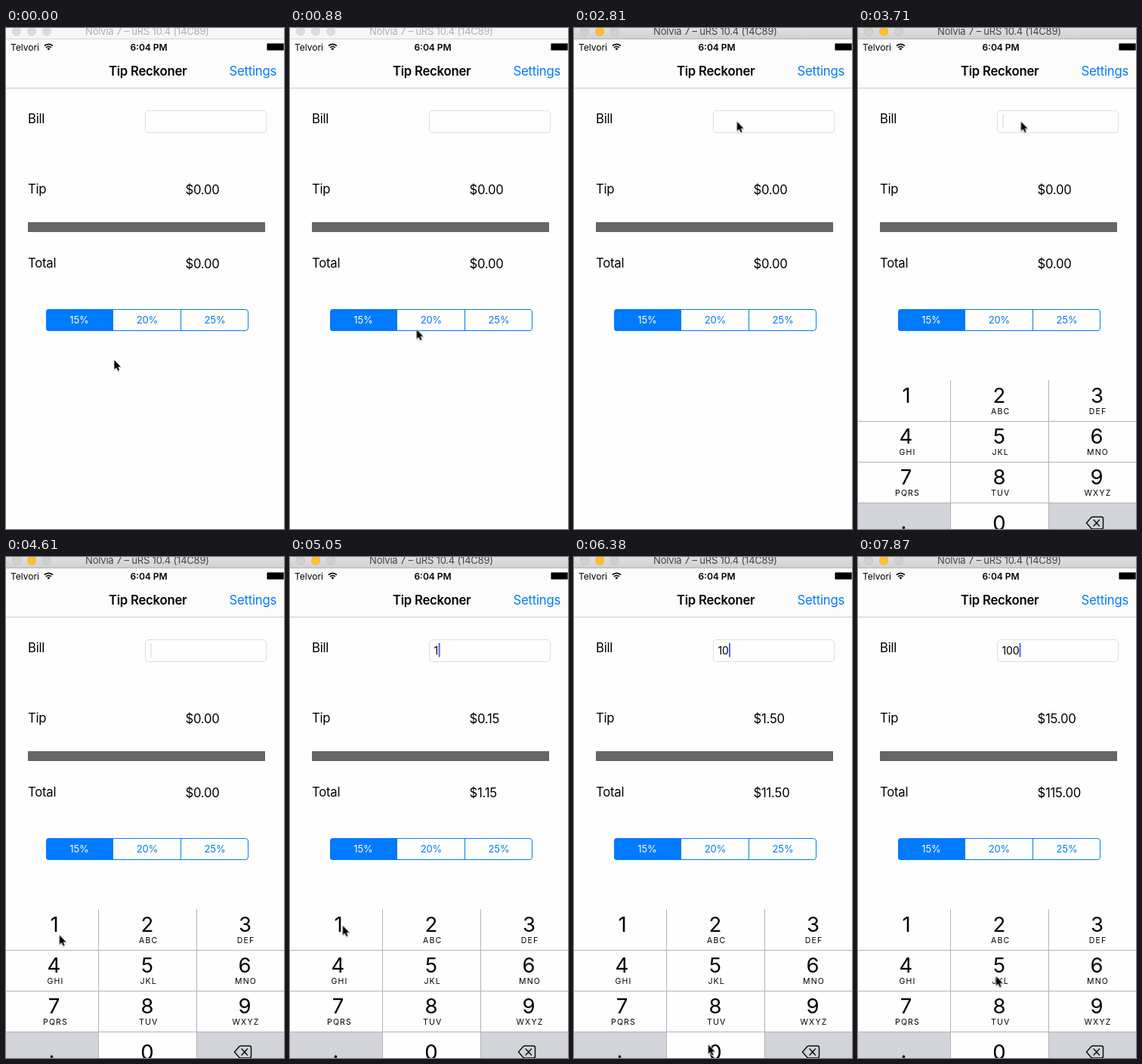
An HTML page for the animation above (8 s loop, 368x663 px).

```html
<!DOCTYPE html>
<html lang="en">
<head>
<meta charset="utf-8">
<title>Tip Reckoner</title>
<style>
html, body { margin: 0; width: 100%; height: 100%; overflow: hidden; background: #fefefe; }
svg { display: block; width: 368px; height: 663px; font: 16.7px Inter, Roboto, sans-serif; letter-spacing: -.22px; }
.mid { text-anchor: middle; }
.bar { font-size: 13px; letter-spacing: -.2px; }
.status { font-size: 12px; letter-spacing: 0; }
.bold { font-weight: 600; }
.bill { font-size: 14px; letter-spacing: -.2px; }
.seg { font-size: 13px; letter-spacing: -.1px; fill: #007aff; }
.digit { font-size: 27.5px; letter-spacing: 0; }
.abc { font-size: 10.5px; letter-spacing: 1.2px; }

.active, .s0, .s1, .s2, .s3, .press1, .press0, #caret, #caretX, #pad, #cursor {
  animation: 8s step-end infinite;
}
.active { animation-name: active; }
.s0 { animation-name: s0; }
.s1 { animation-name: s1; }
.s2 { animation-name: s2; }
.s3 { animation-name: s3; }
.press1 { animation-name: press1; }
.press0 { animation-name: press0; }
#caret { animation-name: blink; }
#caretX { animation-name: caretX; }
#pad { animation-name: pad; }
#cursor { animation-name: cursor; }

@keyframes active { 0% { opacity: 0 } 33.375%, 100% { opacity: 1 } }

/* amounts change when a key is let go */
@keyframes s0 { 0% { opacity: 1 } 63.125%, 100% { opacity: 0 } }
@keyframes s1 { 0%, 79.75%, 100% { opacity: 0 } 63.125% { opacity: 1 } }
@keyframes s2 { 0%, 85.375%, 100% { opacity: 0 } 79.75% { opacity: 1 } }
@keyframes s3 { 0% { opacity: 0 } 85.375%, 100% { opacity: 1 } }
@keyframes press1 { 0%, 63.125%, 100% { opacity: 0 } 61.25% { opacity: 1 } }
@keyframes press0 { 0%, 79.75%, 85.375%, 100% { opacity: 0 } 77.875%, 83.5% { opacity: 1 } }

@keyframes blink {
  0%, 48.25%, 59.375%, 70.5%, 92.75% { opacity: 0 }
  40.75%, 53.875%, 63.125%, 76%, 98.375%, 100% { opacity: 1 }
  46.375%, 52%, 57.5%, 68.625%, 74.125%, 90.875%, 96.5% { opacity: .15 }
}
@keyframes caretX {
  0% { transform: translateX(191px) }
  63.125% { transform: translateX(196.6px) }
  79.75% { transform: translateX(205px) }
  85.375%, 100% { transform: translateX(213.5px) }
}
@keyframes pad {
  0% { transform: translateY(200px) }
  37% { transform: translateY(150px) }
  38.875% { transform: translateY(55px) }
  40.75% { transform: translateY(10px) }
  42.625%, 100% { transform: none }
}
@keyframes cursor {
  0% { transform: translate(142.5px, 438px) }
  1.75% { transform: translate(142.5px, 438px); animation-timing-function: steps(7, start) }
  14.625% { transform: translate(171px, 391px) }
  16.625% { transform: translate(171px, 391px); animation-timing-function: steps(4, start) }
  23.875% { transform: translate(245.5px, 198.5px) }
  25.875% { transform: translate(245.5px, 198.5px); animation-timing-function: steps(4, start) }
  33.25% { transform: translate(215px, 122.5px) }
  48.25% { transform: translate(215px, 122.5px); animation-timing-function: steps(4, start) }
  55.69% { transform: translate(72px, 524px); animation-timing-function: steps(3, start) }
  61.2% { transform: translate(69px, 486.5px) }
  65% { transform: translate(69px, 486.5px); animation-timing-function: steps(4, start) }
  72.25% { transform: translate(160px, 636px) }
  74.125% { transform: translate(160px, 636px); animation-timing-function: steps(2, start) }
  77.75% { transform: translate(177px, 644px) }
  96.5% { transform: translate(177px, 644px); animation-timing-function: steps(2, start) }
  100% { transform: translate(182px, 553.5px) }
}
</style>
</head>
<body>
<svg viewBox="0 0 368 663">
  <defs>
    <linearGradient id="chrome" x1="0" y1="0" x2="0" y2="1">
      <stop offset="0" stop-color="#e0e0e0"/><stop offset="1" stop-color="#d0d0d0"/>
    </linearGradient>
    <filter id="soft" x="-50%" y="-50%" width="200%" height="200%">
      <feDropShadow dx="0" dy="1" stdDeviation=".8" flood-opacity=".4"/>
    </filter>
  </defs>
  <rect width="368" height="663" fill="#fefefe"/>

  <!-- window bar -->
  <g class="bar mid">
    <rect width="368" height="14" fill="#f6f6f6"/>
    <rect y="14" width="368" height="1" fill="#d4d4d4"/>
    <g fill="#dcdcdc" stroke="#d5d5d5">
      <circle cx="14" cy="4.5" r="5.5"/><circle cx="34" cy="4.5" r="5.5"/><circle cx="54" cy="4.5" r="5.5"/>
    </g>
    <text x="187" y="9" fill="#b0b0b0">Nolvia 7 – uRS 10.4 (14C89)</text>
    <g class="active">
      <rect width="368" height="14" fill="url(#chrome)"/>
      <rect y="14" width="368" height="1" fill="#b4b4b4"/>
      <g fill="#d0d0d0" stroke="#c2c2c2">
        <circle cx="14" cy="4.5" r="5.5"/><circle cx="54" cy="4.5" r="5.5"/>
        <circle cx="34" cy="4.5" r="5.5" fill="#ffbf2f" stroke="#f3b32c"/>
      </g>
      <text x="187" y="9" fill="#444">Nolvia 7 – uRS 10.4 (14C89)</text>
    </g>
  </g>

  <!-- status and navigation -->
  <rect y="15" width="368" height="64" fill="#fcfcfc"/>
  <rect y="79" width="368" height="1" fill="#cacaca"/>
  <text class="status" x="6" y="29.5">Telvori</text>
  <g fill="none" stroke="#000" stroke-width="1.7">
    <path d="M50.9 23.6A7.8 7.8 0 0 1 61.9 23.6M53 25.9A4.8 4.8 0 0 1 59.8 25.9"/>
    <path d="M56.4 29.6L54.4 27.4A2.9 2.9 0 0 1 58.4 27.4Z" fill="#000" stroke="none"/>
  </g>
  <text class="status bold mid" x="189" y="29.5">6:04 PM</text>
  <rect x="345" y="20" width="24" height="10" rx="1.5" fill="#888"/>
  <rect x="345.8" y="20.800" width="21.500" height="8.4" rx=".8"/>
  <text class="bold mid" x="187.7" y="63">Tip Reckoner</text>
  <text x="295.5" y="63" fill="#007aff">Settings</text>

  <!-- form -->
  <text x="29" y="126">Bill</text>
  <text x="29" y="219">Tip</text>
  <text x="29" y="317">Total</text>
  <rect x="184.5" y="109.5" width="160" height="29" rx="4.5" fill="#fefefe" stroke="#dedede"/>
  <rect x="29" y="257" width="314" height="13" fill="#666"/>
  <g class="s0"><text x="237.5" y="220">$0.00</text><text x="237.5" y="318">$0.00</text></g>
  <g class="s1">
    <text class="bill" x="190.5" y="129">1</text>
    <text x="237.5" y="220">$0.15</text><text x="237.5" y="318">$1.15</text>
  </g>
  <g class="s2">
    <text class="bill" x="190.5" y="129">10</text>
    <text x="237.5" y="220">$1.50</text><text x="237.5" y="318">$11.50</text>
  </g>
  <g class="s3">
    <text class="bill" x="190.5" y="129">100</text>
    <text x="237.5" y="220">$15.00</text><text x="237.5" y="318">$115.00</text>
  </g>
  <g id="caretX"><rect id="caret" y="114" width="2" height="18.5" fill="#426bf2"/></g>

  <!-- rate picker -->
  <rect x="53.5" y="372.5" width="267" height="28" rx="3.5" fill="#fefefe" stroke="#007aff"/>
  <path d="M142 372H57A4 4 0 0 0 53 376V397A4 4 0 0 0 57 401H142Z" fill="#007aff"/>
  <path d="M231.5 372.5V400.5" stroke="#007aff"/>
  <g class="seg mid">
    <text x="97" y="391" style="fill:#fff">15%</text>
    <text x="187" y="391">20%</text>
    <text x="276.5" y="391">25%</text>
  </g>

  <!-- keypad -->
  <g id="pad">
    <rect y="466" width="368" height="200" fill="#fefefe"/>
    <g fill="#d2d4da">
      <rect y="628" width="122.5" height="40"/><rect x="252.5" y="628" width="116" height="40"/>
      <rect class="press1" y="466" width="122.5" height="54"/>
      <rect class="press0" x="122.5" y="628" width="130" height="40"/>
    </g>
    <path d="M0 520.5H368M0 574.5H368M0 628.5H368M122.5 466V668M252.5 466V668" stroke="#b3b3b6"/>
    <g class="digit mid">
      <text x="64" y="496">1</text><text x="187" y="496">2</text><text x="316.5" y="496">3</text>
      <text x="63.5" y="550">4</text><text x="187" y="550">5</text><text x="316" y="550">6</text>
      <text x="63.5" y="604">7</text><text x="187" y="604">8</text><text x="316" y="604">9</text>
      <text x="60.5" y="663">.</text><text x="187" y="665">0</text>
    </g>
    <g class="abc mid">
      <text x="188.7" y="511">ABC</text><text x="317.6" y="511">DEF</text>
      <text x="65.5" y="565">GHI</text><text x="188.7" y="565">JKL</text><text x="317.6" y="565">MNO</text>
      <text x="65.5" y="619">PQRS</text><text x="188.7" y="619">TUV</text><text x="317.6" y="619">WXYZ</text>
    </g>
    <path d="M302.5 655L308.5 648Q309.5 647 311 647H322Q324.5 647 324.5 649.5V660.5Q324.5 663 322 663H311Q309.5 663 308.5 662ZM312 651L319.5 659M319.5 651L312 659"
      fill="none" stroke="#111" stroke-width="1.5" stroke-linejoin="round" stroke-linecap="round"/>
  </g>

  <g id="cursor">
    <path transform="translate(.8 1.4) scale(.84)" d="M0 0V14.5L3.3 11.5L5.6 16.7L8 15.7L5.7 10.6H10.3Z"
      fill="#000" stroke="#fff" stroke-width="1.8" stroke-linejoin="round" paint-order="stroke" filter="url(#soft)"/>
  </g>
</svg>
</body>
</html>
```
